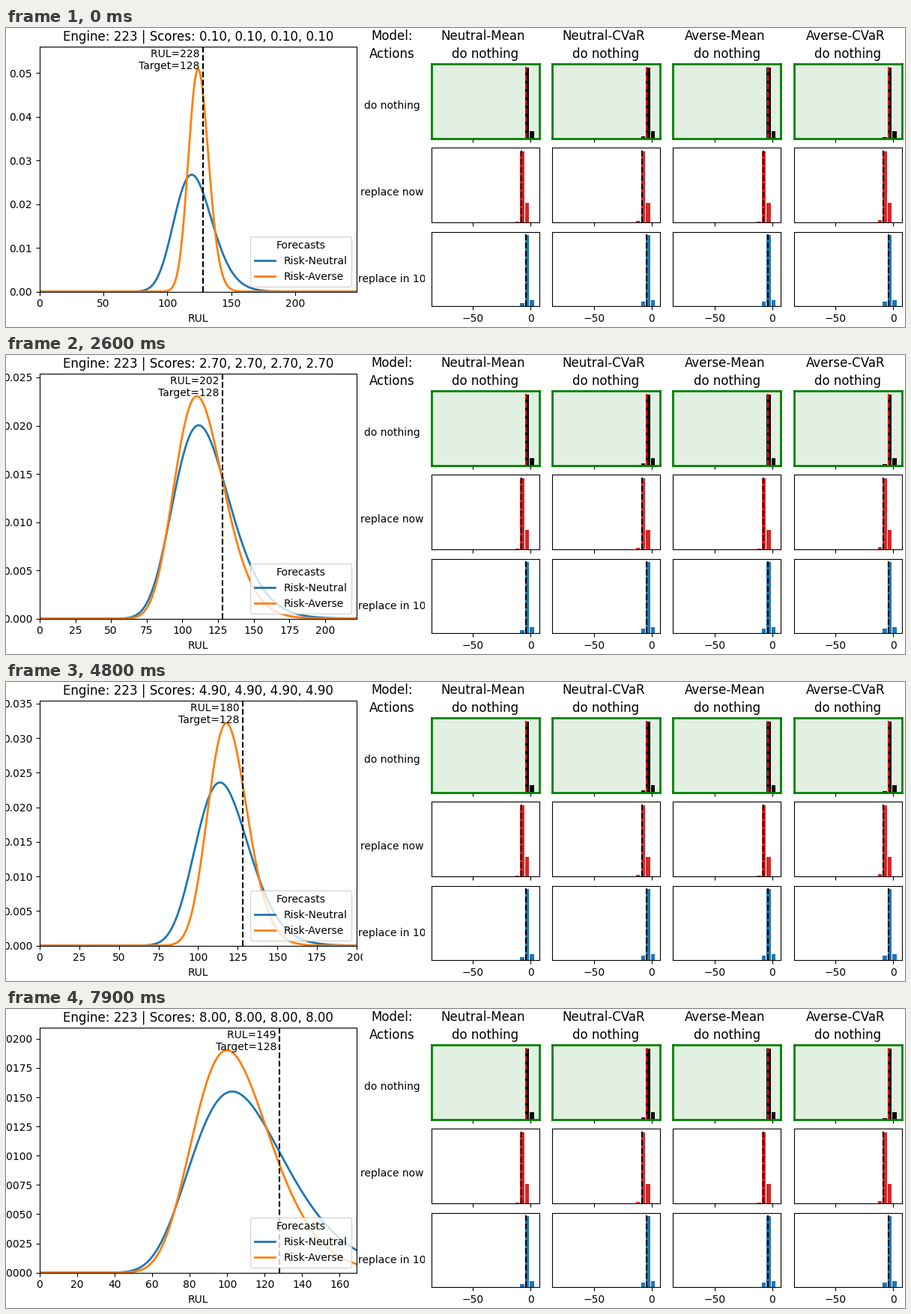
Recreate the animation shown at these times as a matplotlib script. Size 1200 by 400 pixels, loop 8000 ms.

```python
import numpy as np
import matplotlib.pyplot as plt
from matplotlib.animation import FuncAnimation
from matplotlib.patches import Rectangle

W, H, DPI = 1200, 400, 100
FRAMES, INTERVAL = 80, 100
START_RUL, TARGET = 228, 128

plt.rcParams["font.family"] = "DejaVu Sans"
fig = plt.figure(figsize=(W / DPI, H / DPI), dpi=DPI, facecolor="white")


def add_axes(left, top, width, height):
    return fig.add_axes([left / W, 1 - (top + height) / H, width / W, height / H])


def label(x, y, text, size=10, va="baseline"):
    fig.text(x / W, 1 - y / H, text, size=size, ha="center", va=va, zorder=2)


def mask(left, right, zorder):
    fig.add_artist(Rectangle((left / W, 0), (right - left) / W, 1, fc="white",
                             ec="none", transform=fig.transFigure, zorder=zorder))


# Forecast curves: mode and peak density over time
KEYS = [0, 12, 26, 35, 48, 60, 79]
NEUTRAL = ([119.0, 116.2, 111.4, 123.5, 113.8, 120.3, 102.7],
           [.02675, .02558, .02004, .03925, .02359, .03282, .01549])
AVERSE = ([124.0, 118.7, 110.1, 119.2, 117.8, 119.2, 99.9],
          [.05090, .03545, .02305, .03740, .03216, .03246, .01902])


def lognormal(x, mode, peak):
    base = 1 / (mode * peak * np.sqrt(2 * np.pi))
    sigma = base
    for _ in range(8):
        sigma = base * np.exp(-sigma ** 2 / 2)
    return peak * np.exp(-np.log(x / mode) ** 2 / (2 * sigma ** 2))


main = add_axes(44.9, 25.4, 423, 327.2)
main.set_xlabel("RUL")
curves = [main.plot([], [], lw=2, color=color, label=name)[0]
          for name, color in (("Risk-Neutral", "tab:blue"), ("Risk-Averse", "tab:orange"))]
main.axvline(TARGET, color="black", ls="--", lw=1.5)
note = main.text(TARGET, 0.9925, "", ha="right", va="top",
                 transform=main.get_xaxis_transform())
title = main.set_title("")
main.legend(handles=curves, title="Forecasts", loc="lower right")

# Action labels; the column is cut at both sides
mask(476, 559, 1)
label(515, 16.3, "Model:", 12)
label(515.5, 39.9, "Actions", 12)
for y, action in ((104, "do nothing"), (220, "replace now"), (336, "replace in 10")):
    label(515, y, action, va="center")
mask(559, 566, 3)

# Cost histograms, three bars each, one row per action
LEFT, TOP, STEP_X, STEP_Y = 567.7, 47.9, 161.3, 112.35
WIDTH, HEIGHT = 144.1, 99.7
BIN, LAST = 4.26, 1.2
MODELS = ["Neutral-Mean", "Neutral-CVaR", "Averse-Mean", "Averse-CVaR"]
ROWS = [
    dict(color="black", first=2, short=.105, tiny=[0, .025, 0, .018],
         line="red", at=[-3.9, -4.3, -3.8, -4.1]),
    dict(color="tab:red", first=3, short=.275, tiny=[.01, .02, .01, .03],
         line="black", at=[-7.8, -8.2, -7.5, -8.7]),
    dict(color="tab:blue", first=2, short=.085, tiny=[.05, .065, .065, .065],
         line="black", at=[-4.2, -4.5, -3.8, -4.1]),
]


def draw_panel(row, col):
    spec = ROWS[row]
    ax = add_axes(LEFT + STEP_X * col, TOP + STEP_Y * row, WIDTH, HEIGHT)
    centers = LAST - BIN * (spec["first"] - np.arange(3))
    heights = [spec["tiny"][col], 1, spec["short"]]
    ax.bar(centers, heights, width=BIN * .82, color=spec["color"])
    ax.axvline(spec["at"][col], color=spec["line"], ls="--", lw=1.5)
    ax.set(xlim=(-86.2, 7.5), ylim=(0, 1.05), xticks=[-50, 0], yticks=[])
    ax.tick_params(labelbottom=row == 2)
    if row == 0:
        ax.set_facecolor("#e1f0e1")
        for spine in ax.spines.values():
            spine.set(color="green", linewidth=2)


for col, model in enumerate(MODELS):
    center = LEFT + WIDTH / 2 + STEP_X * col
    label(center - 3, 16.3, model, 12)
    label(center, 39.9, "do nothing", 12)
    for row in range(3):
        draw_panel(row, col)


def update(i):
    rul = START_RUL - i
    x = np.linspace(0.01, rul + 20, 500)
    top = 0
    for curve, (modes, peaks) in zip(curves, (NEUTRAL, AVERSE)):
        peak = np.interp(i, KEYS, peaks)
        curve.set_data(x, lognormal(x, np.interp(i, KEYS, modes), peak))
        top = max(top, peak)
    main.set_xlim(0, rul + 20)
    main.set_ylim(0, 1.1 * top)
    note.set_text(f"RUL={rul} \nTarget={TARGET} ")
    scores = ", ".join([f"{(i + 1) / 10:.2f}"] * 4)
    title.set_text(f"Engine: 223 | Scores: {scores}")
    return [*curves, note, title]


anim = FuncAnimation(fig, update, frames=FRAMES, interval=INTERVAL,
                     repeat=True, repeat_delay=0, blit=False)
plt.show()
```
